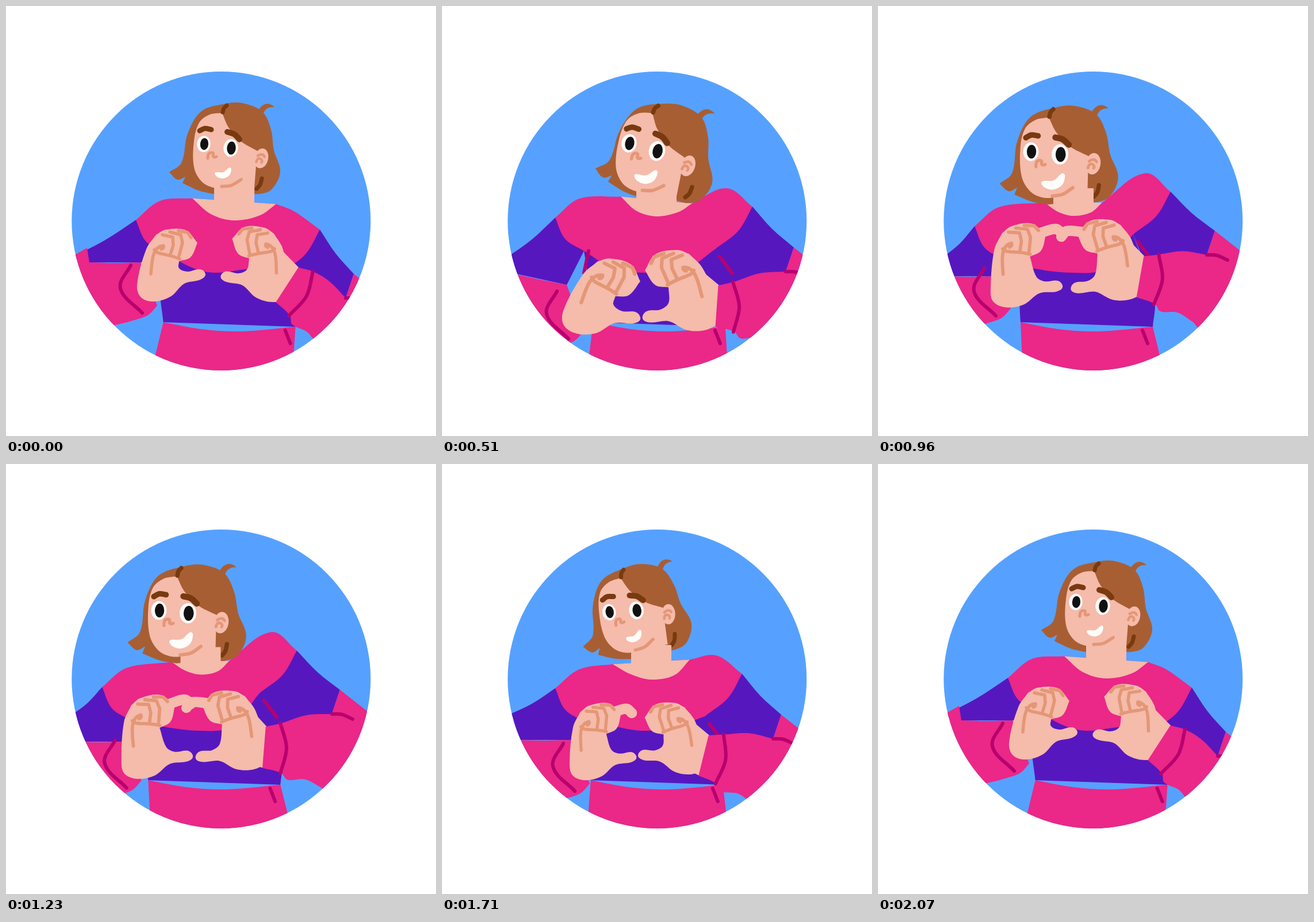
Animation, 748 px wide and 748 px high, one loop 2.1 s. Source, as an HTML page with a canvas:

```html
<!DOCTYPE html>
<html lang="en">
<head>
<meta charset="utf-8">
<title>Heart hands</title>
<style>
html, body { margin: 0; width: 100%; height: 100%; overflow: hidden; background: #fff; }
canvas { display: block; }
</style>
</head>
<body>
<canvas id="stage" width="748" height="748"></canvas>
<script>
const LOOP = 2100, STEP = 30;
const TIMES = [0, 240, 510, 960, 1470, 1710, 2070];
const BLUE = '#56a1ff', PINK = '#eb2788', PURPLE = '#5717bf', SKIN = '#f5bbab', HAIR = '#a85e33';
const BROWN = '#783a10', CREASE = '#e49776', SEAM = '#b8006e', WHITE = '#fffdfa', BLACK = '#111';
const ctx = document.getElementById('stage').getContext('2d');

// Joints of the figure at the key times; the first pose also ends the loop.
const RIG = {
  // x, y, tilt, scale, how far the hair trails the face
  head: [[380, 250, 0, 1, 0], [391, 250, 1, 1.02, 1], [362, 254, 7, 1.06, 11],
    [305, 262, -3, 1.07, 7], [305, 264, -3, 1.07, 7], [328, 260, -12, 1, 3]],
  // x, lowest y, half width, slope
  collar: [[397, 373, 73, 5], [408, 369, 74, 7], [373, 366, 62, 6],
    [340, 365, 50, 0], [338, 369, 50, -2], [364, 375, 67, -4]],
  shoulderL: [[226, 372], [234, 364], [197, 368], [168, 383], [167, 390], [197, 390]],
  shoulderR: [[546, 389], [559, 388], [540, 349], [509, 323], [505, 328], [522, 365]],
  elbowL: [[145, 446], [148, 442], [110, 462], [110, 470], [110, 491], [110, 480]],
  elbowR: [[605, 466], [620, 462], [612, 420], [586, 391], [579, 397], [590, 436]],
  // wrist x, y, palm lift, fist lift, scale, forefinger reach
  handL: [[228, 485, 0, 0, 1, 0], [233, 492, -6, -6, 1.03, 0], [211, 530, -15, -14, 1.12, 0],
    [196, 490, -8, 9, 1.04, 1], [209, 535, -5, 11, 1.03, 1], [222, 520, -4, 9, 0.97, 0.85]],
  handR: [[493, 485, -2, 4, 1, 0], [499, 495, -6, 0, 1.03, 0], [482, 522, -18, -9, 1.12, 0],
    [460, 471, -19, -2, 1.05, 1], [450, 511, -15, -2, 1.02, 1], [459, 507, -9, -3, 0.98, 0]],
  cuffR: [[33], [30], [4], [10], [0], [14]],
};

// Monotone cubic interpolation of every number of a joint.
function sample(poses, t) {
  const last = TIMES.length - 1, time = Math.min(t, TIMES[last]);
  const k = Math.max(0, TIMES.findIndex(v => v >= time) - 1);
  const h = TIMES[k + 1] - TIMES[k], u = (time - TIMES[k]) / h, w = 1 - u;
  return poses[0].map((_, i) => {
    const value = j => poses[j % last][i];
    const rate = j => (value(j + 1) - value(j)) / (TIMES[j + 1] - TIMES[j]);
    const slope = j => {
      if (j === 0 || j === last) return 0;
      const a = rate(j - 1), b = rate(j);
      return a * b > 0 ? 2 * a * b / (a + b) : 0;
    };
    return value(k) * w * w * (1 + 2 * u) + value(k + 1) * u * u * (3 - 2 * u)
      + h * u * w * (slope(k) * w - slope(k + 1) * u);
  });
}

// Smooth path through points; a third entry of 1 keeps a corner sharp.
function curve(pts, closed) {
  const n = pts.length, at = i => pts[(i + n) % n];
  const handle = (i, side) => {
    const p = at(i), to = at(i + side), from = at(i - side);
    const sharp = p[2] || (!closed && (i === 0 || i === n - 1));
    const dx = to[0] - (sharp ? p : from)[0], dy = to[1] - (sharp ? p : from)[1];
    const f = Math.hypot(to[0] - p[0], to[1] - p[1]) / 3 / (Math.hypot(dx, dy) || 1);
    return [p[0] + dx * f, p[1] + dy * f];
  };
  ctx.beginPath();
  ctx.moveTo(pts[0][0], pts[0][1]);
  for (let i = 0; i < (closed ? n : n - 1); i++)
    ctx.bezierCurveTo(...handle(i, 1), ...handle(i + 1, -1), at(i + 1)[0], at(i + 1)[1]);
}

function fill(color, ...pts) {
  curve(pts, true);
  ctx.fillStyle = color;
  ctx.fill();
}

function line(color, width, ...pts) {
  curve(pts, false);
  ctx.strokeStyle = color;
  ctx.lineWidth = width;
  ctx.stroke();
}

function crease(d, width) {
  ctx.strokeStyle = CREASE;
  ctx.lineWidth = width;
  ctx.stroke(new Path2D(d));
}

function oval(color, x, y, rx, ry) {
  ctx.fillStyle = color;
  ctx.beginPath();
  ctx.ellipse(x, y, rx, ry, 0, 0, 7);
  ctx.fill();
}

function placed(x, y, turn, scale, draw) {
  ctx.save();
  ctx.translate(x, y);
  ctx.rotate(turn * Math.PI / 180);
  ctx.scale(scale, scale);
  draw();
  ctx.restore();
}

// Maps points of a turned, scaled and maybe mirrored limb to the stage.
function frameAt(x, y, turn, scale = 1, flip = 1) {
  const a = turn * Math.PI / 180, c = Math.cos(a) * scale, s = Math.sin(a) * scale;
  return (u, v, corner) => [x + flip * (u * c - v * s), y + u * s + v * c, corner];
}

const from = ([x, y]) => (dx, dy, corner) => [x + dx, y + dy, corner];
const middle = (p, q, dx = 0, dy = 0) => [(p[0] + q[0]) / 2 + dx, (p[1] + q[1]) / 2 + dy];

function drawBody(j) {
  const [cx, cy, half, slope] = j.collar, drop = half * 0.46;
  const left = from(j.shoulderL), right = from(j.shoulderR);
  const pitL = left(50, 58, 1), pitR = right(-65, 74, 1);
  const neckL = [cx - half, cy - drop - slope, 1], neckR = [cx + half, cy - drop + slope, 1];
  const hip = 363 + (cx - 340) * 0.45, hipL = hip - 115, hipR = hip + 115;

  fill(PURPLE, pitL, [hipL - 6, 490], [hipL, 550, 1], [hipR, 558, 1], [hipR + 3, 510], pitR);
  fill(PINK, [hipL, 550, 1], [hip - 50, 562], [hip + 20, 566], [hipR, 558, 1], [498, 640, 1], [252, 640, 1]);
  line(SEAM, 6, [hipR - 18, 564], [hipR - 9, 587]);

  drawSleeveL(j, pitL);
  const elbow = from(j.elbowR), cuff = cuffFrame(j);
  fill(PURPLE, right(0, 0, 1), middle(j.shoulderR, j.elbowR, -2, 3), elbow(0, 0, 1),
    elbow(-14, 42, 1), cuff(25, -30, 1), cuff(0, -30, 1), pitR);

  fill(PINK, left(0, 0, 1), left(42, -33), neckL, neckR, right(-45, -32), right(0, 0, 1),
    middle(j.shoulderR, pitR, 8, 5), pitR, [pitR[0] - 50, 457], [hip - 25, 464],
    [pitL[0] + 50, 456], pitL, middle(j.shoulderL, pitL, -8, 8));
  fill(SKIN, neckL, [cx - half * 0.55, cy - drop * 0.32], [cx, cy], [cx + half * 0.6, cy - drop * 0.25], neckR);
  line(SEAM, 6, [pitR[0] + 8, pitR[1] + 13], [pitR[0] + 30, pitR[1] + 42]);
  line(SEAM, 6, [pitL[0] + 8, pitL[1]], [pitL[0], pitL[1] + 38]);
  drawForearmL(j);
}

function sleeveEnd(j) {
  return [j.handL[0] + 6, Math.max(j.elbowL[1], j.handL[1] - 45), 1];
}

function drawSleeveL(j, pit) {
  const end = sleeveEnd(j);
  fill(PURPLE, [...j.shoulderL, 1], middle(j.shoulderL, [112, 438], 2, 3), [112, 438, 1],
    [...j.elbowL, 1], end, pit);
}

function drawForearmL(j) {
  const [ex, ey] = j.elbowL, [sx, sy] = j.shoulderL, wrist = from(j.handL), end = sleeveEnd(j);
  const edge = 438 + (sy - 438) * (ex - 115) / (sx - 112);
  fill(PINK, [105, 441, 1], [ex - 4, ex > 120 ? edge : ey, 1], [ex, ey, 1], middle([ex, ey], end, 0, 1), end,
    wrist(35, 36, 1), wrist(20, 52), wrist(0, 60), wrist(-38, 70), [90, j.handL[1] + 90, 1]);
  line(SEAM, 6, wrist(-11, -34), wrist(-29, 6), wrist(9, 49));
}

function cuffFrame(j) {
  return frameAt(j.handR[0] - 4, j.handR[1], j.cuffR[0]);
}

function drawForearmR(j) {
  const cuff = cuffFrame(j), elbow = from(j.elbowR), inner = elbow(-14, 42, 1);
  fill(PINK, cuff(0, -36, 1), cuff(26, -44), middle(cuff(26, -44), inner, 0, -6), inner,
    elbow(0, 0, 1), elbow(70, 55, 1), [620, 640, 1],
    cuff(105, 62, 1), cuff(75, 50), cuff(45, 53), cuff(33, 42), cuff(0, 36, 1));
  line(SEAM, 6, cuff(25, -44), cuff(39, -2), cuff(32, 43));
  line(SEAM, 6, elbow(-14, 42), elbow(4, 43), elbow(22, 51));
}

function drawHand([x, y, lift, curl, scale, reach], flip, wrist = []) {
  const palm = frameAt(x, y, -lift, scale, flip), fist = frameAt(x, y, -curl, scale, flip);
  line(SKIN, 18, fist(70 + 29 * reach, -78), fist(75 + 48 * reach, -80), fist(80 + 52 * reach, -71));
  if (wrist.length) fill(SKIN, ...wrist, palm(50, 10, 1), fist(24, -65, 1));
  fill(SKIN, palm(0, 0), fist(16, -62), fist(33, -87, 1), fist(50, -96), fist(85, -95), fist(105, -73, 1),
    fist(93, -48), fist(73, -41, 1), palm(73, -29), palm(88, -23), palm(110, -27), palm(119, -18),
    palm(110, -9), palm(82, -2), palm(59, 20), palm(30, 29), palm(7, 22));
  ctx.save();
  ctx.translate(x, y);
  ctx.scale(flip * scale, scale);
  ctx.rotate(-curl * Math.PI / 180);
  ctx.translate(30, -96);
  crease('M-6 77C-4 60-5 29 16 28Q17 33 12 34M0 35C4 44 22 41 44 51' +
    'M14 9L32 13L33 27L28 43M27 4L46 9L49 23L43 46M42 2L58 5L64 14', 5.5);
  ctx.restore();
}

function drawHair() {
  fill(HAIR, [284, 289, 1], [305, 273], [316, 222], [340, 183], [382, 170], [412, 169], [446, 184],
    [461, 215], [466, 251], [477, 288], [462, 319], [440, 327], [423, 325, 1], [361, 327, 1],
    [335, 321], [307, 308, 1], [312, 297, 1], [298, 302]);
  ctx.fill(new Path2D('M438 183Q445 170 455 170Q463 171 467 176Q458 175 452 180Q448 184 447 189Z'));
  line(BROWN, 7, [445, 300], [442, 311], [436, 318]);
}

function drawEye(x, y, t, size) {
  const u = Math.min(1, Math.abs(t - 240) / 120), open = u * u * (3 - 2 * u);
  ctx.save();
  ctx.translate(x, y);
  ctx.rotate(0.08);
  ctx.scale(size, size * (0.05 + 0.95 * open));
  if (u > 0.1) oval(WHITE, 0, 0, 12.3, 15);
  oval(BLACK, 1, 0, 7.5, 11);
  ctx.restore();
}

function drawFace(t, scale) {
  fill(SKIN, [376, 186, 1], [387, 211], [408, 235], [437, 252, 1], [432, 316, 1], [385, 316],
    [361, 316], [340, 305], [327, 280], [327, 235], [336, 203], [354, 189]);
  line(BROWN, 7, [377, 185], [379, 178], [384, 173]);
  placed(444, 265, 13, 1, () => {
    oval(SKIN, 0, 0, 12, 17.5);
    crease('M-7-3Q0-10 5-4M-7 8Q-7 0-1 1Q4 3 2 7', 4.5);
  });
  drawEye(344, 240, t, 0.95 * scale);
  drawEye(391, 247, t, 1.03 * scale);
  line(BROWN, 9, [337, 217], [346, 213], [357, 215]);
  line(BROWN, 10, [385, 219], [397, 223], [406, 232]);
  placed(358, 260, 0, 1, () => crease('M-7 5Q-7-6 0-5Q4-5 2 1Q4 4 8 2', 5));
  placed(377, 290, 0, 1 + (scale - 1) * 5, () =>
    fill(WHITE, [-14, 1], [-11, -1], [1, -1], [12, -9], [15, -6], [11, 5], [0, 10], [-10, 7]));
  line(CREASE, 5.5, [375, 314], [392, 312], [409, 302]);
}

function drawHead(j, t) {
  const [x, y, tilt, scale, trail] = j.head, [cx, cy] = j.collar;
  const about = (dx, draw) => placed(x + dx, y, tilt, scale, () => {
    ctx.translate(-380, -250);
    draw();
  });
  about(trail, drawHair);
  fill(SKIN, [cx - 35, y + 55, 1], [cx + 35, y + 55, 1], [cx + 35, cy - 20, 1], [cx - 35, cy - 20, 1]);
  about(0, () => drawFace(t, scale));
}

function frame() {
  const t = Math.floor(performance.now() % LOOP / STEP) * STEP;
  const j = {};
  for (const name in RIG) j[name] = sample(RIG[name], t);
  ctx.fillStyle = '#fff';
  ctx.fillRect(0, 0, 748, 748);
  ctx.save();
  ctx.lineCap = ctx.lineJoin = 'round';
  ctx.beginPath();
  ctx.arc(374.3, 374, 260, 0, 7);
  ctx.clip();
  ctx.fillStyle = BLUE;
  ctx.fillRect(0, 0, 748, 748);
  drawBody(j);
  drawHead(j, t);
  const cuff = cuffFrame(j);
  drawHand(j.handL, 1);
  drawHand(j.handR, -1, [cuff(2, -36, 1), cuff(2, 36, 1)]);
  drawForearmR(j);
  ctx.restore();
  requestAnimationFrame(frame);
}
frame();
</script>
</body>
</html>
```
